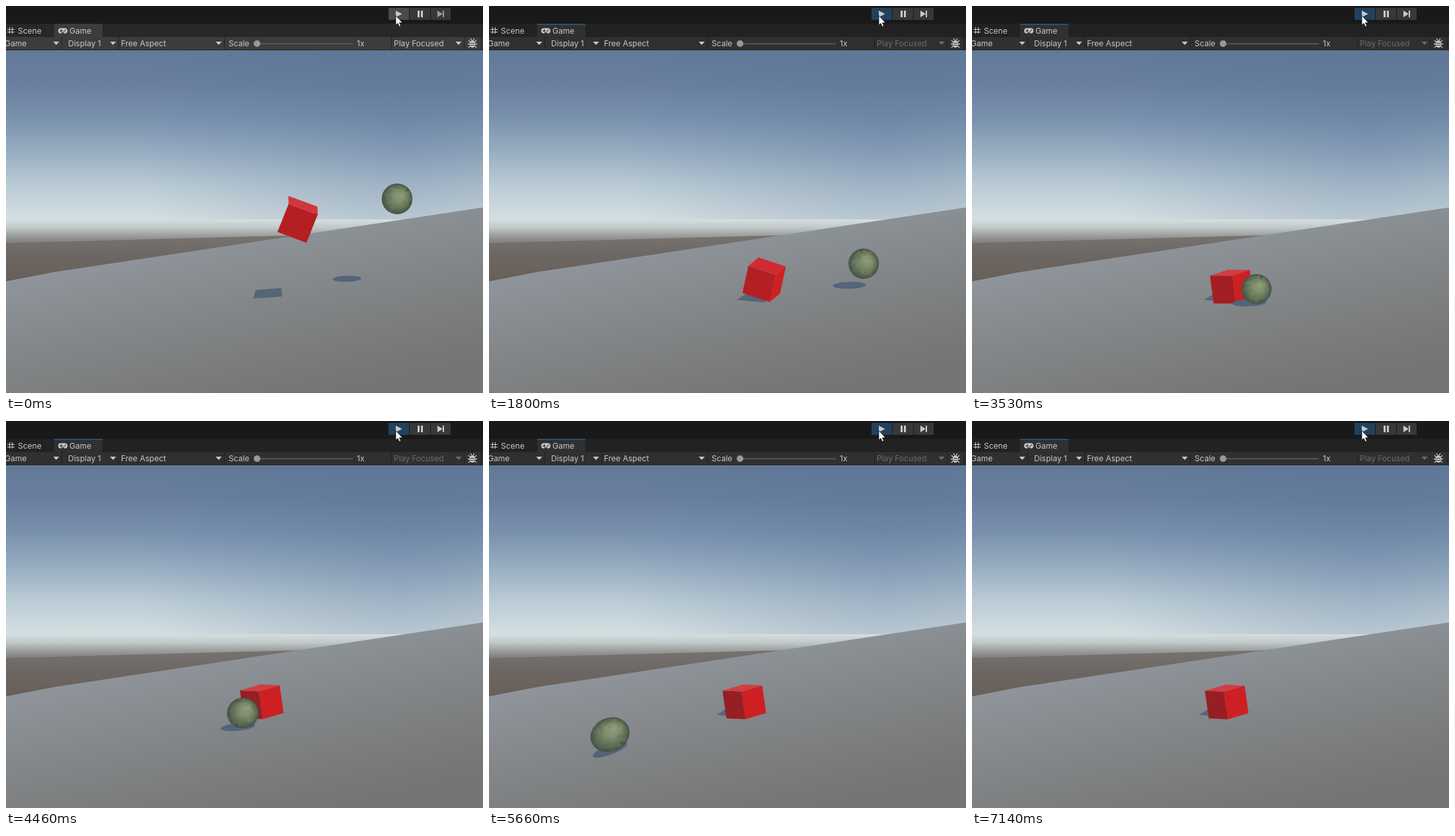
Animation of 722 by 586 pixels, one loop 7.16 s. Source, as an HTML page with a canvas:

```html
<!DOCTYPE html>
<html lang="en">
<head>
<meta charset="utf-8">
<title>Physics scene</title>
<style>
html, body { margin: 0; width: 100%; height: 100%; overflow: hidden; background: #191919; }
canvas { display: block; width: 722px; height: 586px; }
</style>
</head>
<body>
<canvas id="stage" width="722" height="586"></canvas>
<script>
const ctx = document.getElementById('stage').getContext('2d');
const LOOP = 7160;
const GRAVITY = 451; // px per second squared
const clamp = v => Math.max(0, Math.min(1, v));
const mix = (a, b, p) => a + (b - a) * p;

function poly(points, fill) {
  ctx.beginPath();
  points.forEach(([x, y]) => ctx.lineTo(x, y));
  ctx.closePath();
  ctx.fillStyle = fill;
  ctx.fill();
}
function rect(x, y, w, h, fill) {
  ctx.fillStyle = fill;
  ctx.fillRect(x, y, w, h);
}
function oval(x, y, rx, ry, angle, fill) {
  ctx.beginPath();
  ctx.ellipse(x, y, rx, ry, angle, 0, Math.PI * 2);
  ctx.fillStyle = fill;
  ctx.fill();
}
function shade(g, ...colors) {
  colors.forEach((c, i) => g.addColorStop(i / (colors.length - 1), c));
  return g;
}
const linear = (x0, y0, x1, y1, ...colors) => shade(ctx.createLinearGradient(x0, y0, x1, y1), ...colors);
const radial = (x0, y0, r0, x1, y1, r1, ...colors) => shade(ctx.createRadialGradient(x0, y0, r0, x1, y1, r1), ...colors);

function drawWorld() {
  rect(0, 67, 722, 256, linear(0, 67, 0, 323, '#627997', '#697f9d', '#7a91ae', '#97adc1', '#bacbd5', '#d4dfe1'));
  rect(0, 323, 722, 37, linear(0, 323, 0, 360, '#d4dfe1', '#c0c9c8', '#9b9f9d', '#7d7b78'));
  rect(0, 67, 722, 256, radial(600, 195, 0, 600, 195, 400, 'rgba(82,110,148,.3)', 'rgba(82,110,148,.15)', 'rgba(82,110,148,0)'));
  poly([[0, 359], [410, 348], [450, 347], [450, 420], [0, 420]], linear(0, 347, 0, 416, '#777370', '#6c6662', '#685f59'));
  poly([[0, 417], [72, 403], [722, 305], [722, 586], [0, 586]],
    linear(320, 345, 375, 600, '#8f959c', '#868a8d', '#7d7f80', '#757575'));
}

// Both bodies drop together from rest
const fallen = t => t < 730 ? 0 : GRAVITY / 2 * ((t - 620) / 1000) ** 2;

// time, centre x and y, yaw, pitch and roll in degrees, edge length
const CUBE = [
  [1250, 441, 412.5, 96, 14, 21.8, 47],
  [1800, 416.5, 414.5, 74, 21.5, 12.4, 45],
  [2150, 401.5, 425, 64.5, 8.7, -6.5, 43.5],
  [3050, 401.5, 425, 64.5, 8.7, -6.5, 43.5],
  [3850, 387.5, 425, 41, 9.6, -8, 43],
  [7160, 385.5, 425.5, 41, 9.6, -8, 43]
];

function cubePose(t) {
  const i = CUBE.findIndex(k => k[0] > t);
  if (i < 1) return CUBE[0];
  const a = CUBE[i - 1], b = CUBE[i], p = (t - a[0]) / (b[0] - a[0]);
  return a.map((v, k) => mix(v, b[k], p));
}

function drawCube(t) {
  const [, x, restY, yaw, pitch, roll, size] = cubePose(t);
  const high = t < 1250 ? Math.max(0, 89.5 - fallen(t)) : 0;
  const [a, tip, turn] = [yaw, pitch, roll].map(d => d * Math.PI / 180);

  // Project an edge given its sideways, depth and downward parts
  const edge = (side, depth, down) => {
    const y = down * Math.cos(tip) - depth * Math.sin(tip);
    return [side * Math.cos(turn) - y * Math.sin(turn), side * Math.sin(turn) + y * Math.cos(turn)].map(v => v * size);
  };
  const right = edge(Math.cos(a), Math.sin(a), 0);
  const left = edge(-Math.sin(a), Math.cos(a), 0);
  const down = edge(0, 0, 1);
  const corner = (r, l, d) => [x, restY - high].map((c, k) =>
    c + right[k] * (r - .5) + left[k] * (l - .5) + down[k] * (d - .5));

  const k = high / 90, sx = x - 20 - .28 * high, sy = 444 - .1 * high;
  poly([[sx - 6 - 12 * k, sy - 9 + 4 * k], [sx + 21, sy - 8], [sx + 22, sy + 5], [sx - 22, sy + 1 + 7 * k]], '#566679');

  const near = corner(0, 0, 0), foot = corner(0, 0, 1), r = corner(1, 0, 0), l = corner(0, 1, 0);
  poly([near, r, corner(1, 0, 1), foot], '#ce2023');
  poly([near, l, corner(0, 1, 1), foot], `rgb(${mix(149, 180, clamp((yaw - 41) / 24))},31,34)`);
  poly([near, r, corner(1, 1, 0), l], `rgb(209,${76 - 1.6 * pitch},${84 - 1.6 * pitch})`);
}

// Rolls off after landing, then gathers speed again after touching the cube
function ballX(t) {
  const u = Math.max(0, t / 1000 - 1.303), w = t / 1000 - 3.6;
  return t < 3780 ? 592 - 43.5 * u - 13 * u * u : 410 - 23.5 * w - 42 * w * w;
}
function ballHeight(t) {
  const hop = 21.2 - GRAVITY / 2 * ((t - 1610) / 1000) ** 2;
  return Math.max(0, t < 1303 ? 106.5 - fallen(t) : hop);
}

let seed = 7;
const rand = () => (seed = seed * 16807 % 2147483647) / 2147483647;
const MOSS = Array.from({ length: 30 }, () => {
  const a = rand() * 6.28, r = Math.sqrt(rand());
  return { x: r * Math.cos(a), y: r * Math.sin(a), w: .06 + rand() * .16, h: .03 + rand() * .09,
    turn: rand() * 3, fill: rand() < .5 ? 'rgba(48,62,42,.1)' : 'rgba(176,190,150,.1)' };
});

function drawBall(t) {
  const x = ballX(t), high = ballHeight(t), ground = 414 + (509 - x) * .187;
  if (x < -48) return;
  const close = Math.max(0, (510 - x) / 327) ** 2; // grows towards the camera
  const r = 22.4 + Math.max(0, x - 510) / 95;

  const shadowX = x - 14 * Math.min(1, (x - 183) / 326) - high * .58;
  oval(shadowX, ground + 20.5 + 2.5 * close - high * .055, 26 - 4.3 * clamp(high / 60) + 2 * Math.min(1.5, close),
    5.4 - high * .008 + 2 * close, -.03 - .33 * Math.min(1, close), '#53647a');

  ctx.save();
  ctx.translate(x, ground - high);
  ctx.rotate(-.43 * Math.min(1, close));
  ctx.scale(r + 8 * close, r + 3 * close);
  oval(0, 0, 1, 1, 0, radial(.28, -.25, .1, 0, 0, 1, '#8a9a79', '#82926f', '#708062', '#5d6d54', '#435046'));
  ctx.clip();
  ctx.rotate((x - 592) / 24);
  MOSS.forEach(m => oval(m.x, m.y, m.w, m.h, m.turn, m.fill));
  ctx.restore();
}

const INK = '#c8c8c8';
function label(text, x, y, fill = INK) {
  ctx.font = '12px Inter, "Liberation Sans", sans-serif';
  ctx.fillStyle = fill;
  ctx.fillText(text, x, y);
}
function arrowDown(x, fill = INK) {
  poly([[x - 4.5, 54], [x + 4.5, 54], [x, 59]], fill);
}

function drawGamepad() {
  ctx.beginPath();
  ctx.roundRect(79, 33.5, 14, 8, 4);
  ctx.fillStyle = INK;
  ctx.fill();
  rect(81, 37, 5, 1.2, '#3a3a3a');
  rect(83, 35, 1.2, 5, '#3a3a3a');
  oval(88, 38.5, 1, 1, 0, '#3a3a3a');
  oval(90, 36.5, 1, 1, 0, '#3a3a3a');
  rect(84, 40, 4, 2, '#3a3a3a');
}

function drawBug() {
  ctx.save();
  ctx.translate(706, 57.5);
  ctx.beginPath();
  for (const s of [-1, 1]) {
    for (const v of [-1, 0, 1]) {
      ctx.moveTo(s * 3, v * 2.5);
      ctx.lineTo(s * (7 - Math.abs(v)), v * 5.5);
    }
    ctx.moveTo(s, -5.5);
    ctx.lineTo(s * 3, -8.5);
  }
  ctx.strokeStyle = INK;
  ctx.lineWidth = 1.3;
  ctx.stroke();
  oval(0, 0, 4, 5.5, 0, INK);
  rect(-3, -1.5, 6, 1, '#383838');
  rect(-3, 1.5, 6, 1, '#383838');
  ctx.restore();
}

function drawCursor() {
  poly([[590, 14.5], [590, 29], [593, 26.2], [595.3, 31.3], [597.6, 30.2], [595.4, 25.3], [600, 25.2]], '#ffffff');
  ctx.strokeStyle = '#111';
  ctx.lineWidth = .8;
  ctx.stroke();
}

function drawEditor(t) {
  const pressed = t >= 110, tinted = t >= 180, running = t >= 730;
  const bar = tinted ? '#303030' : '#3c3c3c';
  rect(0, 0, 722, 27, '#191919');
  rect(0, 27, 722, 20, tinted ? '#222222' : '#282828');
  rect(73, 27, 73, 20, bar);
  rect(0, 47, 722, 20, bar);
  rect(0, 66, 722, 1, '#232323');
  if (running) rect(73, 27, 73, 1.5, '#2b5b85');

  rect(579, 3, 31, 18, pressed ? '#21415f' : '#4a4a4a');
  rect(611, 3, 31, 18, '#383838');
  rect(643, 3, 30, 18, '#383838');
  poly([[590, 7], [599.5, 12], [590, 17]], INK);
  rect(623, 7, 3, 10, INK);
  rect(628, 7, 3, 10, INK);
  const step = running ? INK : '#9a9a9a';
  poly([[653, 7], [661, 12], [653, 17]], step);
  rect(661, 7, 2, 10, step);

  for (const i of [0, 4]) {
    rect(5 + i, 32, 1, 10, INK);
    rect(2, 35 + i, 11, 1, INK);
  }
  label('Scene', 18, 42);
  drawGamepad();
  label('Game', 96, 42);

  [84, 170, 330, 583, 693, 719].forEach(x => rect(x, 47, 1, 19, '#1f1f1f'));
  label('Game', -2, 61);
  label('Display 1', 94, 61);
  label('Free Aspect', 174, 61);
  label('Scale', 337, 61);
  label('1x', 531, 61);
  const mode = tinted ? '#6c6c6c' : INK;
  label('Play Focused', 587, 61, mode);
  [76, 162, 322].forEach(x => arrowDown(x));
  arrowDown(685, mode);
  rect(380, 56.5, 145, 1.5, '#606060');
  oval(380, 57, 5, 5, 0, '#999999');
  drawBug();
  drawCursor();
}

function draw(now) {
  const t = now % LOOP;
  drawWorld();
  drawCube(t);
  drawBall(t);
  drawEditor(t);
}

const start = performance.now();
function tick(now) {
  draw(Math.max(0, now - start));
  requestAnimationFrame(tick);
}
draw(0);
requestAnimationFrame(tick);
</script>
</body>
</html>
```
